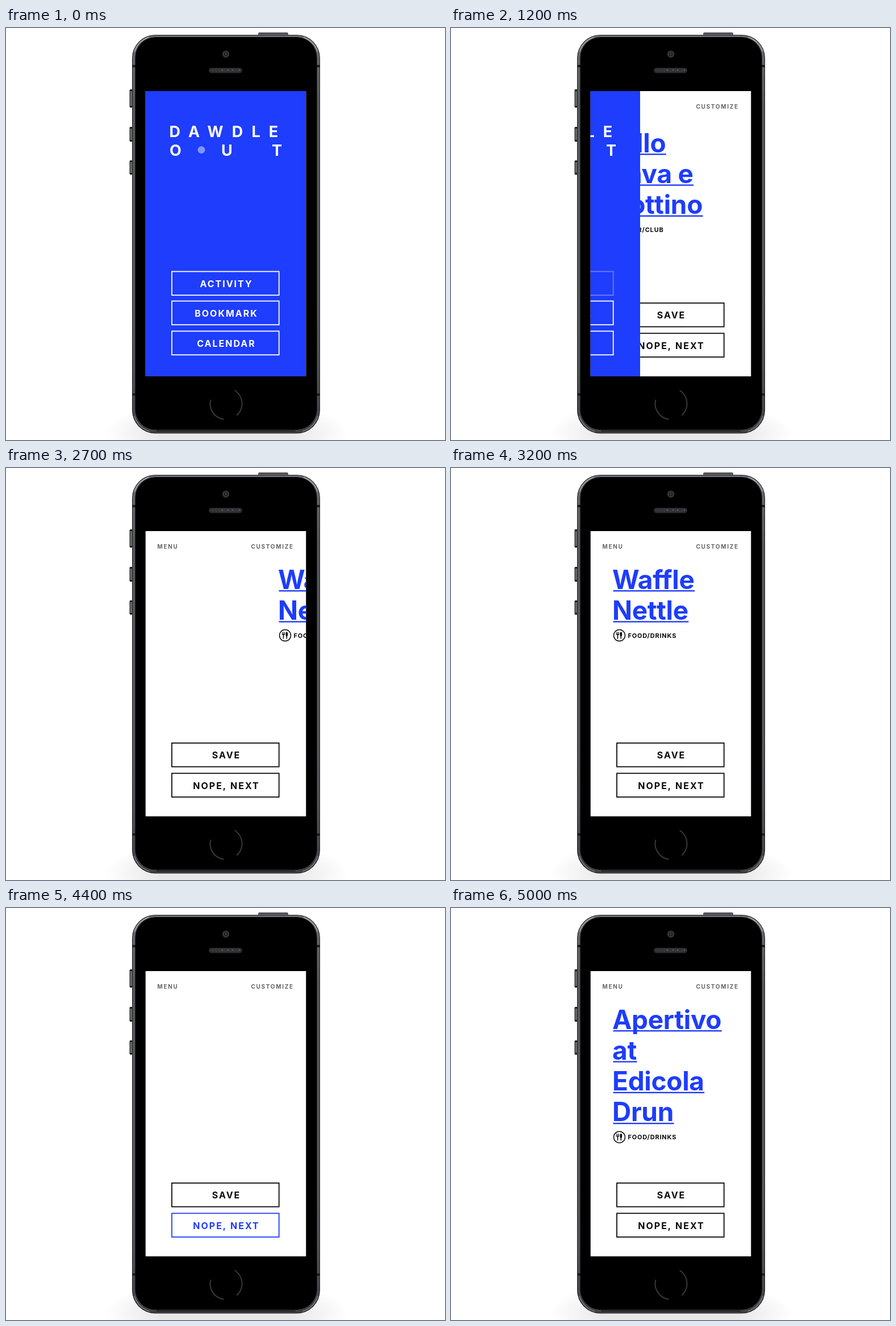
Animation, 773 px wide and 725 px high, one loop 6.6 s. Source, as an HTML page with a canvas:

```html
<!DOCTYPE html>
<html lang="en">
<head>
<meta charset="utf-8">
<title>App walkthrough</title>
<style>
html, body { margin: 0; width: 100%; height: 100%; overflow: hidden; background: #fff; }
canvas { display: block; }
</style>
</head>
<body>
<canvas id="stage" width="773" height="725"></canvas>
<script>
const ctx = document.getElementById('stage').getContext('2d');
const LOOP = 6600, STEP = 100;
const BLUE = '#1e3dfc', INK = '#0b0b0b', GREY = '#666';
const SCREEN = { x: 245.5, y: 111, w: 283, h: 502 };

const CARDS = [
  { lines: ['Rillo', 'Fava e', 'Bottino'], y: 219, kind: 'BAR/CLUB', icon: glass },
  { lines: ['Waffle', 'Nettle'], y: 213, kind: 'FOOD/DRINKS', icon: cutlery },
  { lines: ['Apertivo', 'at', 'Edicola', 'Drun'], y: 213, kind: 'FOOD/DRINKS', icon: cutlery }
];

function text(str, x, y, size, color, spacing = 0, align = 'left', weight = 700) {
  ctx.font = `${weight} ${size}px Inter, "Open Sans", sans-serif`;
  ctx.letterSpacing = spacing + 'px';
  ctx.textAlign = align;
  ctx.fillStyle = color;
  ctx.fillText(str, x, y);
}

function pill(x, y, w, h, r, fill) {
  ctx.beginPath();
  ctx.roundRect(x, y, w, h, r);
  ctx.fillStyle = fill;
  ctx.fill();
}

function disc(x, y, r, fill) {
  ctx.beginPath();
  ctx.arc(x, y, r, 0, Math.PI * 2);
  ctx.fillStyle = fill;
  ctx.fill();
}

function arc(x, y, r, from, to, color, width) {
  ctx.beginPath();
  ctx.arc(x, y, r, from * Math.PI / 180, to * Math.PI / 180);
  ctx.strokeStyle = color;
  ctx.lineWidth = width;
  ctx.stroke();
}

function path(points, color, width) {
  ctx.beginPath();
  points.forEach(([x, y]) => ctx.lineTo(x, y));
  ctx.strokeStyle = color;
  ctx.lineWidth = width;
  ctx.stroke();
}

function gradient(x0, y0, x1, y1, stops) {
  const g = ctx.createLinearGradient(x0, y0, x1, y1);
  stops.forEach((c, i) => g.addColorStop(i / (stops.length - 1), c));
  return g;
}

function shadow() {
  ctx.save();
  ctx.translate(388, 712);
  ctx.scale(1, 0.27);
  const g = ctx.createRadialGradient(0, 0, 120, 0, 0, 215);
  g.addColorStop(0, 'rgba(0,0,0,.09)');
  g.addColorStop(1, 'rgba(0,0,0,0)');
  disc(0, 0, 215, g);
  ctx.restore();
}

function phone() {
  shadow();
  const metal = gradient(217, 0, 224, 0, ['#18191b', '#77797d', '#1d1e20']);
  [[108, 32], [174, 26], [233, 25]].forEach(([y, h]) => {
    pill(217.5, y, 7, h, 2, metal);
    pill(218, y, 5, 3, 1, '#222');
    pill(218, y + h - 3, 5, 3, 1, '#222');
  });
  pill(444, 8, 53, 7, 2, gradient(0, 8, 0, 14, ['#222326', '#74767a', '#2a2b2e']));

  pill(222, 12, 331, 701.5, 41, '#202124');
  pill(223, 13, 329, 699.5, 40, gradient(0, 13, 0, 713,
    ['#6a6c70', '#55575b', '#55575b', '#55575b', '#55575b', '#505256', '#3d3f43']));
  [228.5, 546.5].forEach((x, i) => {
    arc(i ? 512 : 263, 53, 38.5, i ? -72 : 198, i ? -18 : 252, '#a4a6aa', 1.6);
    arc(i ? 512 : 263, 673, 38, i ? 15 : 105, i ? 75 : 165, '#85878b', 1.3);
  });
  [65, 643].forEach(y => {
    ctx.fillStyle = '#1b1c1e';
    ctx.fillRect(222, y, 7, 4);
    ctx.fillRect(546, y, 7, 4);
  });
  pill(227.5, 16, 320, 691, 36, '#000');
  path([[265, 709], [510, 709]], '#1d1e20', 2);

  disc(387, 46, 6.2, '#343438');
  disc(387, 46, 3.2, '#202024');
  disc(387, 46, 1.4, '#45454b');
  pill(357, 70, 59, 9.5, 4.7, '#2b2b2f');
  pill(360, 72, 53, 5, 2.5, '#353539');
  [381, 391, 399, 411].forEach(x => disc(x, 74, 0.9, '#77777c'));
  arc(387.5, 661, 28, 98, 194, '#39393c', 2);
  arc(387.5, 661, 28, -58, 48, '#39393c', 2);
}

function button(label, y, color) {
  ctx.strokeStyle = color;
  ctx.lineWidth = 1.8;
  ctx.strokeRect(292, y, 188.7, 41.7);
  text(label, 388, y + 27.3, 16, color, 2, 'center');
}

function menu(shift, pressed) {
  ctx.save();
  ctx.translate(-shift, 0);
  ctx.fillStyle = BLUE;
  ctx.fillRect(SCREEN.x, SCREEN.y, SCREEN.w - 0.5, SCREEN.h);
  text('DAWDLE', 287.5, 191.5, 27, '#fff', 15.2);
  text('O', 288, 224.5, 27, '#fff');
  text('U', 389, 224.5, 27, '#fff', 0, 'center');
  text('T', 486, 224.5, 27, '#fff', 0, 'right');
  disc(344, 214.5, 6.5, '#8296ff');
  button('ACTIVITY', 428.5, pressed ? 'rgba(255,255,255,.34)' : '#fff');
  button('BOOKMARK', 480.5, '#fff');
  button('CALENDAR', 533.5, '#fff');
  ctx.restore();
}

function glass(x, y) {
  ctx.beginPath();
  ctx.moveTo(x - 5.5, y - 5);
  ctx.lineTo(x + 5.5, y - 5);
  ctx.lineTo(x, y + 1.5);
  ctx.fillStyle = INK;
  ctx.fill();
  path([[x, y], [x, y + 6]], INK, 1.5);
  path([[x - 3, y + 6], [x + 3, y + 6]], INK, 1.3);
}

function cutlery(x, y) {
  [-5, -3, -1].forEach(d => path([[x + d, y - 6], [x + d, y - 1.5]], INK, 1));
  path([[x - 5, y - 1.5], [x - 1, y - 1.5]], INK, 1.6);
  path([[x - 3, y - 2], [x - 3, y + 6]], INK, 1.6);
  ctx.beginPath();
  ctx.ellipse(x + 2.8, y - 2.2, 1.9, 4, 0, 0, Math.PI * 2);
  ctx.fillStyle = INK;
  ctx.fill();
  path([[x + 2.8, y], [x + 2.8, y + 6]], INK, 1.6);
}

function card({ lines, y, kind, icon }, shift) {
  ctx.save();
  ctx.translate(shift, 0);
  lines.forEach((line, i) => {
    const base = y + i * 54.3;
    text(line, 284, base - 0.5, 46, BLUE, -0.3);
    ctx.fillRect(285.5, base + 2, ctx.measureText(line).width - 1, 2.4);
  });
  const mid = y + (lines.length - 1) * 54.3 + 27.3;
  arc(296.5, mid, 10, 0, 360, INK, 1.5);
  icon(296.5, mid);
  text(kind, 311.5, mid + 4, 11, INK, 0.8);
  ctx.restore();
}

function activity(n) {
  ctx.fillStyle = '#fff';
  ctx.fillRect(SCREEN.x, SCREEN.y, SCREEN.w, SCREEN.h);
  text('MENU', 266.5, 142, 10, GREY, 1.7);
  text('CUSTOMIZE', 431.5, 142, 10, GREY, 1.7);

  const leave = from => -41 * Math.max(0, n - from);
  if (n < 26) card(CARDS[0], leave(19));
  else if (n < 44) card(CARDS[1], n < 32 ? 39 * (32 - n) : leave(39));
  // The last card overshoots by 7 px, then settles.
  else card(CARDS[2], n < 50 ? 56 * (49 - n) - 7 : 0);

  const pressed = (n >= 19 && n < 26) || (n >= 37 && n < 48);
  button('SAVE', 484, INK);
  button('NOPE, NEXT', 537.3, pressed ? BLUE : INK);
}

function draw(t) {
  const n = Math.floor(t / STEP);
  ctx.fillStyle = '#fff';
  ctx.fillRect(0, 0, 773, 725);
  phone();
  ctx.save();
  ctx.beginPath();
  ctx.rect(SCREEN.x, SCREEN.y, SCREEN.w, SCREEN.h);
  ctx.clip();
  activity(n);
  if (n < 14) menu(65 * Math.max(0, n - 9), n >= 5);
  ctx.restore();
}

const start = performance.now();
function tick() {
  draw((performance.now() - start) % LOOP);
  requestAnimationFrame(tick);
}
tick();
</script>
</body>
</html>
```
